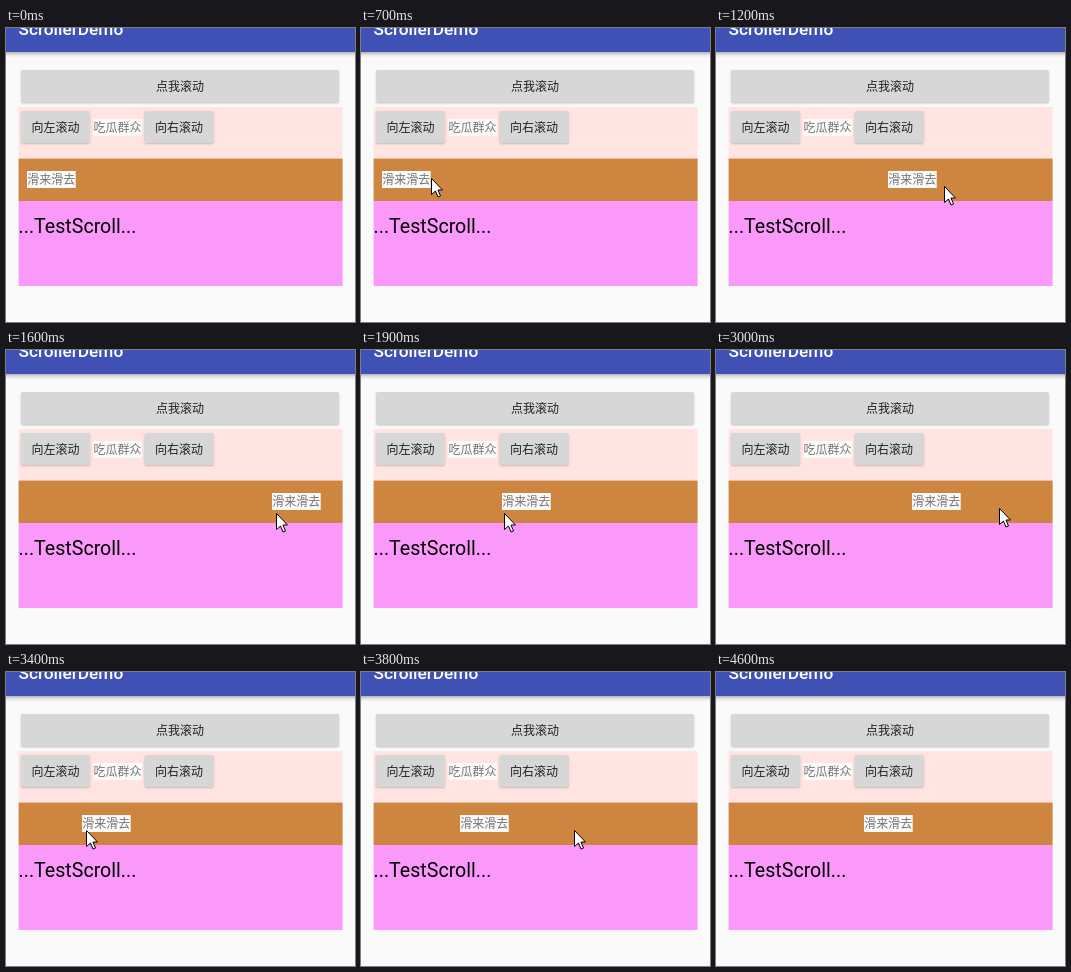
Write an HTML page with a canvas that moves like this. It is 349x294 px and loops after 5.2 s.

```html
<!DOCTYPE html>
<html lang="zh-CN">
<head>
<meta charset="utf-8">
<title>ScrollerDemo</title>
<style>
  html, body { margin: 0; width: 100%; height: 100%; overflow: hidden; background: #fafafa; }
  canvas { display: block; width: 349px; height: 294px; }
</style>
</head>
<body>
<canvas id="stage" width="349" height="294"></canvas>
<script>
const ctx = document.getElementById('stage').getContext('2d');
const LOOP = 5200, TICK = 100;
const CJK = '12px "Noto Sans CJK SC", "Noto Sans CJK", sans-serif';
const LATIN = 'Roboto, sans-serif';

// Pointer swings as [tick, position] keys, eased in between
const pathX = [
  [1, 191], [6, 54], [11, 208], [12, 228], [15, 302], [18, 177], [19, 143],
  [22, 98], [23, 143], [25, 307], [27, 98], [29, 232], [30, 283], [34, 80],
  [37, 135], [38, 213], [39, 244], [41, 167], [42, 184], [45, 300]
];
const pathY = [[1, 114], [6, 149], [12, 158], [15, 163], [23, 163], [24, 158]];
const ENTER = 1, GRAB = 7, DROP = 42, LEAVE = 45;
const GRIP = 36, REST = 21;

function along(path, tick) {
  const i = path.findIndex(key => key[0] >= tick);
  if (i < 0) return path[path.length - 1][1];
  if (i === 0) return path[0][1];
  const [t0, a] = path[i - 1], [t1, b] = path[i];
  const p = (tick - t0) / (t1 - t0);
  return Math.round(a + (b - a) * p * p * (3 - 2 * p));
}

// The dragged label trails the pointer by one tick
function labelX(tick) {
  return tick <= GRAB ? REST : along(pathX, Math.min(tick - 1, DROP)) - GRIP;
}

function box(x, y, w, h, color) {
  ctx.fillStyle = color;
  ctx.fillRect(x, y, w, h);
}

function text(str, x, y, font, color, align = 'left') {
  ctx.font = font;
  ctx.fillStyle = color;
  ctx.textAlign = align;
  ctx.fillText(str, x, y);
}

function button(str, x, y, w, h) {
  ctx.save();
  ctx.shadowColor = 'rgba(0,0,0,.2)';
  ctx.shadowBlur = 2;
  ctx.shadowOffsetY = 1;
  ctx.fillStyle = '#d7d7d7';
  ctx.beginPath();
  ctx.roundRect(x, y, w, h, 2);
  ctx.fill();
  ctx.restore();
  text(str, x + w / 2, y + h / 2 + 4.5, CJK, '#212121', 'center');
}

function label(str, x, y) {
  box(x, y, 48.7, 17, '#fafafa');
  text(str, x + .3, y + 13, CJK, '#757575');
}

function panel(y, h, color) {
  box(12.6, y, 324, h, color);
}

function toolbar() {
  const fade = ctx.createLinearGradient(0, 24, 0, 30);
  fade.addColorStop(0, 'rgba(0,0,0,.28)');
  fade.addColorStop(.5, 'rgba(0,0,0,.08)');
  fade.addColorStop(1, 'rgba(0,0,0,0)');
  box(0, 24, 349, 6, fade);
  box(0, 0, 349, 24, '#3f51b5');
  text('ScrollerDemo', 12.5, 7, '500 17.3px ' + LATIN, '#fff');
}

function pointer(x, y) {
  const shape = [[0, 0], [0, 16], [4, 12.5], [6.5, 18.5], [9, 17.5], [6.5, 11.5], [11, 11.5]];
  ctx.beginPath();
  shape.forEach(([dx, dy]) => ctx.lineTo(x + dx + .5, y + dy + .5));
  ctx.closePath();
  ctx.fillStyle = '#fff';
  ctx.fill();
  ctx.strokeStyle = '#000';
  ctx.lineWidth = 1;
  ctx.stroke();
}

function draw(tick) {
  box(0, 0, 349, 294, '#fafafa');
  toolbar();
  button('点我滚动', 15, 42, 318, 32.5);
  panel(79, 52, '#ffe4e1');
  button('向左滚动', 15, 83, 69, 32);
  label('吃瓜群众', 87.3, 91);
  button('向右滚动', 138.6, 83, 69, 32);
  panel(130.6, 42.4, '#cd853f');
  label('滑来滑去', labelX(tick), 143);
  panel(173, 85, '#fb99fb');
  text('...TestScroll...', 12.6, 205.3, '19.6px ' + LATIN, '#000');
  if (tick >= ENTER && tick <= LEAVE) pointer(along(pathX, tick), along(pathY, tick));
}

const start = performance.now();
function loop(now) {
  draw(Math.floor(Math.max(0, now - start) % LOOP / TICK));
  requestAnimationFrame(loop);
}
draw(0);
requestAnimationFrame(loop);
</script>
</body>
</html>
```
